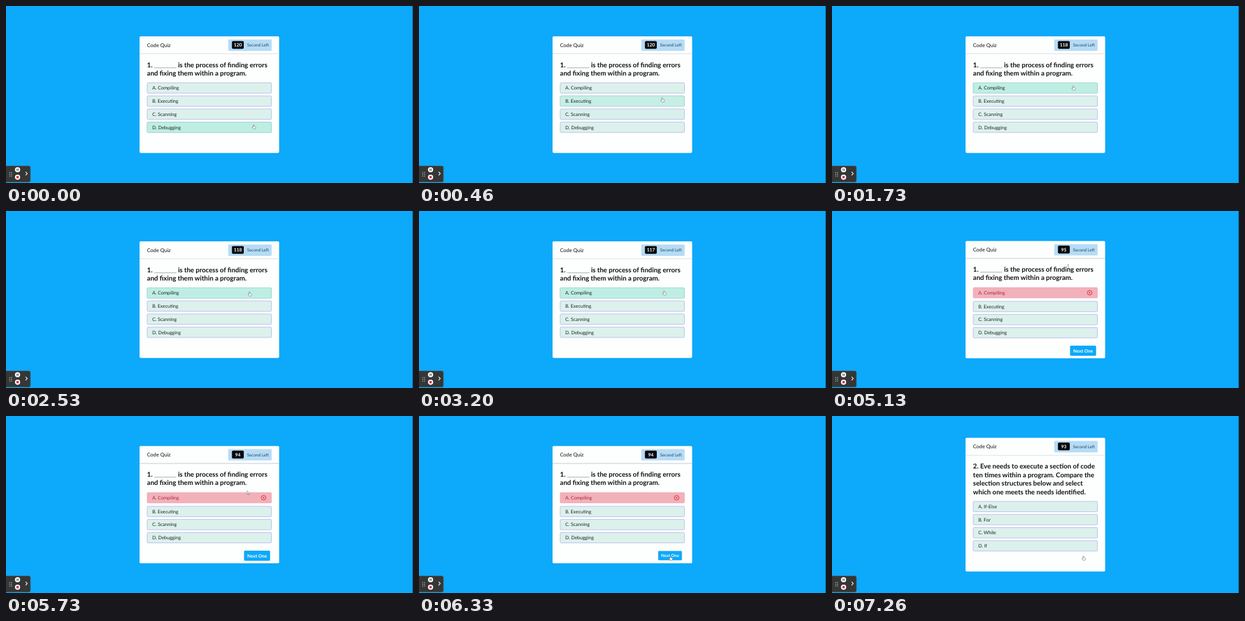
An HTML page that plays this animation: 640 px wide and 280 px high, repeating every 7460 ms.

```html
<!DOCTYPE html>
<html lang="en">
<head>
<meta charset="utf-8">
<title>Code Quiz</title>
<style>
  html, body { margin: 0; width: 100%; height: 100%; overflow: hidden; background: #0da9fa; }
  svg { display: block; width: 640px; height: 280px; }
  text { font-family: Lato, "Open Sans", sans-serif; fill: #111; text-rendering: geometricPrecision; }
  .title { font-size: 8.1px; }
  .question { font-size: 10.5px; font-weight: 700; }
  .blank { font: 700 9px "Liberation Sans", sans-serif; }
  .option { font-size: 7.5px; fill: #222; }
  .wrong { fill: #a32836; }
  .left { font-size: 6.65px; fill: #24445c; }
  .count { font-size: 7.4px; font-weight: 700; fill: #fff; text-anchor: middle; }
  .next { font-size: 7.2px; font-weight: 700; fill: #fff; text-anchor: middle; }
</style>
</head>
<body>
<svg id="stage" viewBox="0 0 640 280"></svg>
<script>
const LOOP = 7460, CLICK = 3460, NEXT = 6730;
const stage = document.getElementById('stage');

function add(parent, tag, attrs = {}, text = '') {
  const el = document.createElementNS('http://www.w3.org/2000/svg', tag);
  for (const key in attrs) el.setAttribute(key, attrs[key]);
  if (text) el.textContent = text;
  parent.append(el);
  return el;
}
const group = parent => add(parent, 'g');
const label = (parent, cls, x, y, text) => add(parent, 'text', { class: cls, x, y }, text);
const box = (parent, x, y, width, height, rx, fill, more = {}) =>
  add(parent, 'rect', { x, y, width, height, rx, fill, ...more });
const show = (el, on) => el.setAttribute('display', on ? 'inline' : 'none');
const clamp = v => Math.min(1, Math.max(0, v));
const smooth = v => v * v * (3 - 2 * v);

function makeCard({ top, bottom, line, question, options, rows, wrong }) {
  const g = group(stage);
  box(g, 210, top, 219.5, bottom - top, 1.8, '#fdfefe');
  box(g, 210, top + 27.3, 219.5, 0.7, 0, line);
  label(g, 'title', 221.7, top + 16.8, 'Code Quiz');
  box(g, 349.5, top + 5.1, 68.2, 17.8, 1.4, '#b5dcf6');
  box(g, 355.3, top + 7.4, 18.6, 12.4, 1.8, '#050608');
  const count = label(g, 'count', 364.6, top + 16.2, '');
  label(g, 'left', 379, top + 16.1, 'Second Left');
  question.forEach((parts, i) => {
    for (const [x, text] of parts)
      label(g, text[0] === '_' ? 'blank' : 'question', x, top + 48.5 + i * 13.55, text);
  });
  const glows = options.map((text, i) => {
    const y = rows[i] - 8.2, bad = wrong === i;
    box(g, 222, y, 195.4, 16.4, 1.4, bad ? '#f2b1ba' : '#dcf1ec',
      { stroke: bad ? '#efa5b0' : '#a9a9ec', 'stroke-width': 0.7 });
    const glow = box(g, 222, y, 195.4, 16.4, 1.4, '#beeee3',
      { stroke: '#97d9cb', 'stroke-width': 0.7, opacity: 0 });
    label(g, bad ? 'option wrong' : 'option', 230, rows[i] + 2.6, text);
    if (bad) {
      const y = rows[i];
      add(g, 'path', {
        d: `M401.4 ${y}a3.7 3.7 0 1 0 7.4 0a3.7 3.7 0 1 0 -7.4 0M403.7 ${y - 1.4}l2.8 2.8m0 -2.8l-2.8 2.8`,
        fill: 'none', stroke: '#d8263a', 'stroke-width': 0.9
      });
    }
    return glow;
  });
  return { g, count, glows };
}

box(stage, 639, 0, 1, 280, 0, '#0a5f90');

const first = {
  question: [
    [[221.8, '1.'], [233, '_______'], [270.4, 'is the process of finding errors']],
    [[221.8, 'and fixing them within a program.']]
  ],
  options: ['A. Compiling', 'B. Executing', 'C. Scanning', 'D. Debugging']
};
const rows = [129.7, 150.4, 171.1, 191.9];
const cards = [
  makeCard({ ...first, top: 48, bottom: 232.4, line: '#d2d6d8', rows }),
  makeCard({ ...first, top: 47.4, bottom: 233, line: '#a5b4bc', rows: [129.3, 151.1, 171.8, 192.5], wrong: 0 }),
  makeCard({
    top: 34.5, bottom: 246, line: '#d2d6d8',
    question: [
      'Eve needs to execute a section of code',
      'ten times within a program. Compare the',
      'selection structures below and select',
      'which one meets the needs identified.'
    ].map((text, i) => [[221.8, i ? text : '2. ' + text]]),
    options: ['A. If-Else', 'B. For', 'C. While', 'D. If'],
    rows: [143.2, 163.9, 184.7, 205.4]
  })
];

const button = group(stage);
box(button, -20.5, -8, 41, 16, 1.6, '#0da9fa');
label(button, 'next', 0, 2.6, 'Next One');

// Recorder bar
box(stage, -2, 253, 40.3, 25.6, 2.5, '#353636', { stroke: '#55595b', 'stroke-width': 0.6 });
for (let i = 0; i < 6; i++)
  add(stage, 'circle', { cx: 5.9 + i % 2 * 2.8, cy: 263.6 + (i >> 1) * 2.7, r: 0.75, fill: '#c4c6c7' });
for (const cy of [259, 270.8]) add(stage, 'circle', { cx: 18.2, cy, r: 4.1, fill: '#fff' });
box(stage, 16.7, 257.3, 1, 3.4, 0, '#333');
box(stage, 18.8, 257.3, 1, 3.4, 0, '#333');
box(stage, 16.4, 269, 3.6, 3.6, 0.6, '#e0274a');
add(stage, 'path', { d: 'M30.8 262.4l2.6 2.7l-2.6 2.7', fill: 'none', stroke: '#fff', 'stroke-width': 1.1 });

// Pointer shapes, hot spot at 0,0
const pointer = group(stage);
const ink = { fill: '#fff', stroke: '#4a5558', 'stroke-width': 0.5, 'stroke-linejoin': 'round' };
const shapes = {
  hand: add(pointer, 'path', {
    ...ink,
    d: 'M-.6 .3Q0 -.5 .6 .3V2.4L2.9 3Q3.6 3.2 3.5 4L3 6.6H-.6L-2.3 4.2Q-2.2 3.3 -1.3 3.8L-.6 4.4Z'
  }),
  arrow: add(pointer, 'path', { ...ink, d: 'M0 0V5.8L1.3 4.6L2.2 6.6L3.1 6.2L2.2 4.3H4Z' }),
  beam: add(pointer, 'path', {
    d: 'M-1.2 -3H1.2M0 -3V3M-1.2 3H1.2', fill: 'none', stroke: '#59636a', 'stroke-width': 0.6
  })
};

// time, x, y
const path = [
  [0, 389.3, 187.8], [730, 379.3, 126.3], [2000, 379.3, 126.3], [2260, 382.5, 128],
  [2460, 382.5, 128], [2730, 384, 127], [2930, 384, 127], [3200, 385.3, 126.3],
  [3660, 384.8, 130], [4000, 384.8, 130], [4730, 367, 70], [5130, 371.3, 88],
  [5600, 377, 104], [6200, 395.3, 221.5], [LOOP, 395.3, 221.5]
];
function cursor(t) {
  const i = path.findIndex((p, n) => n && t <= p[0]);
  const [t0, x0, y0] = path[i - 1], [t1, x1, y1] = path[i];
  const k = smooth((t - t0) / (t1 - t0));
  return { x: x0 + (x1 - x0) * k, y: y0 + (y1 - y0) * k };
}

// Eased hover: share of the recent past spent over a band
function hover(t, y0, y1) {
  let hits = 0;
  for (let i = 0; i < 10; i++) {
    const { y } = cursor(Math.max(0, t - i * 16));
    if (y > y0 && y < y1) hits++;
  }
  return hits / 10;
}

function seconds(t) {
  const ticks = Math.floor((t + 270) / 1000);
  return 120 - ticks - (ticks > 3 ? 20 : 0);
}

function shape(t, y) {
  if (t < CLICK || y > 213) return 'hand';
  return y > 78 && y < 112 ? 'beam' : 'arrow';
}

function draw(t) {
  const now = t < CLICK ? 0 : t < NEXT ? 1 : 2;
  cards.forEach((card, i) => show(card.g, i === now));
  cards[now].count.textContent = seconds(t);
  cards[0].glows.forEach((glow, i) =>
    glow.setAttribute('opacity', hover(t, rows[i] - 8.2, rows[i] + 8.2)));

  const fade = clamp((t - CLICK) / 200) * (1 - clamp((t - NEXT) / 250));
  button.setAttribute('opacity', fade);
  const size = 1 - 0.09 * hover(t, 213, 229);
  button.setAttribute('transform', `translate(394.8 220.9) scale(${size})`);

  const { x, y } = cursor(t), kind = shape(t, y);
  pointer.setAttribute('transform', `translate(${x} ${y})`);
  for (const name in shapes) show(shapes[name], name === kind);
}

const start = performance.now();
function frame() {
  draw((performance.now() - start) % LOOP);
  requestAnimationFrame(frame);
}
frame();
</script>
</body>
</html>
```
